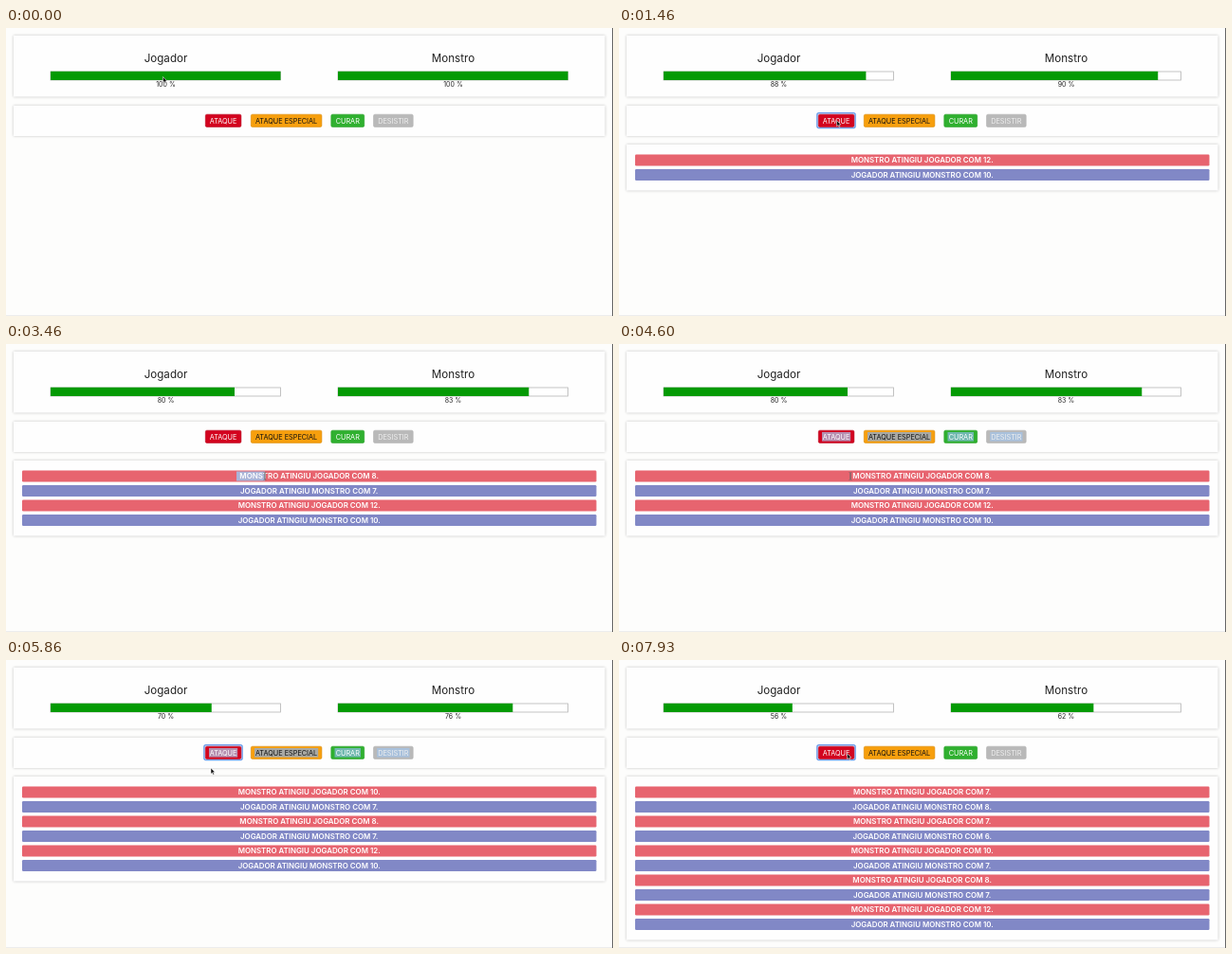
These frames come from a looping animation (640 by 304 pixels, 8 s). An HTML page:

```html
<!DOCTYPE html>
<html lang="pt">
<head>
<meta charset="utf-8">
<style>
html, body { margin: 0; width: 100%; height: 100%; overflow: hidden; background: #fdfdfc; }
svg { display: block; width: 640px; height: 304px; font-family: Inter, Roboto, sans-serif; text-anchor: middle; }
.panel { fill: #fefefe; filter: drop-shadow(0 .6px 1.6px rgba(0, 0, 0, .24)); }
.title { font-size: 11.6px; fill: #222; }
.value { font-size: 7px; fill: #222; }
.button { font-size: 7.3px; }
.log { font-size: 7.9px; font-weight: 600; fill: #fff; }
</style>
</head>
<body>
<svg id="stage" viewBox="0 0 640 304"></svg>
<script>
const LOOP = 8000;
const stage = document.getElementById('stage');

function add(parent, tag, attrs, text) {
  const node = document.createElementNS('http://www.w3.org/2000/svg', tag);
  set(node, attrs);
  if (text) node.textContent = text;
  parent.appendChild(node);
  return node;
}
function set(node, attrs) {
  for (const key in attrs) node.setAttribute(key, attrs[key]);
}
function show(node, on) {
  node.setAttribute('visibility', on ? 'visible' : 'hidden');
}
const rect = (parent, x, y, width, height, attrs) =>
  add(parent, 'rect', { x, y, width, height, ...attrs });
const label = (parent, x, y, cls, text, fill) =>
  add(parent, 'text', { x, y, class: cls, ...(fill && { style: 'fill:' + fill }) }, text);

// Each round: time, damage to player, damage to monster
const rounds = [[530, 12, 10], [1730, 8, 7], [5130, 10, 7], [7260, 7, 6], [7800, 7, 8]];

// Pointer stops: time, x, y
const path = [
  [0, 165.5, 51.5], [60, 165.5, 51.5], [460, 229.5, 97.5], [2800, 229.5, 97.5],
  [3060, 243.5, 139.5], [3460, 273, 139.5], [3600, 281, 139.5], [3660, 281, 139.5],
  [4060, 250, 139.5], [4330, 250, 139.5], [4530, 244, 139.5], [4860, 244, 139.5],
  [5060, 229, 98], [5600, 229, 98], [5860, 216, 114], [6330, 216, 114],
  [6600, 236, 103], [7000, 236, 103], [7130, 240.5, 98.5], [LOOP, 240.5, 98.5]
];

function pointerAt(t) {
  let i = 1;
  while (i < path.length - 1 && t >= path[i][0]) i++;
  const [t0, x0, y0] = path[i - 1], [t1, x1, y1] = path[i];
  const p = Math.min(1, (t - t0) / (t1 - t0));
  const e = p * p * (3 - 2 * p);
  return [x0 + (x1 - x0) * e, y0 + (y1 - y0) * e];
}

rect(stage, 0, 0, 640, 304, { fill: '#fdfdfc' });
rect(stage, 639, 0, 1, 304, { fill: '#666' });
rect(stage, 0, 303, 639, 1, { fill: '#ececec' });
rect(stage, 8, 8, 623.5, 64.5, { class: 'panel' });
rect(stage, 8, 82, 623.5, 32, { class: 'panel' });

function makeBar(x, name) {
  label(stage, x + 121.5, 35.6, 'title', name);
  rect(stage, x, 46, 242.5, 9, { fill: '#fff', stroke: '#b4b4b4', 'stroke-width': .8 });
  const fill = rect(stage, x, 45.8, 242.5, 9.2, { fill: '#049a04' });
  const value = label(stage, x + 121.5, 62.1, 'value', '100 %');
  return life => {
    set(fill, { width: 242.5 * life / 100 });
    value.textContent = life + ' %';
  };
}
const setPlayer = makeBar(47, 'Jogador');
const setMonster = makeBar(350, 'Monstro');

const focusRing = rect(stage, 208.9, 89.8, 40.2, 15.8,
  { rx: 2, fill: '#fff', stroke: '#6d9eeb', 'stroke-width': 1.5 });

// x, width, caption, fill, border, text, selection
const marks = [
  [210, 38.2, 'ATAQUE', '#d3041f', '#b8041c', '#fff', '#b58fb0'],
  [258, 75.2, 'ATAQUE ESPECIAL', '#f79f0d', '#d98a08', '#111', '#a9a9a4'],
  [342.5, 35.5, 'CURAR', '#2fb02f', '#26a026', '#fff', '#6fb8ae'],
  [387.2, 42.3, 'DESISTIR', '#b9b9b9', '#b3b3b3', '#efefef', '#a9c1dc']
].map(([x, w, text, fill, stroke, color, tint]) => {
  rect(stage, x + .3, 91.2, w - .6, 13.2, { rx: 1.5, fill, stroke, 'stroke-width': .6 });
  const mark = rect(stage, x + 4, 93, w - 8, 9.6, { fill: tint });
  label(stage, x + w / 2, 100.5, 'button', text, color);
  return mark;
});

const logPanel = rect(stage, 8, 123, 623.5, 48.5, { class: 'panel' });
const rows = rounds.flatMap(() => ['#e7646f', '#8188c6']).map((fill, i) => {
  const y = 133.5 + 15.5 * i;
  const group = add(stage, 'g', {});
  rect(group, 17, y, 605.5, 12, { rx: 1.2, fill });
  const mark = i ? null : rect(group, 243, y + 1, 0, 10, { fill: '#a9b4d8' });
  const text = label(group, 319.7, y + 8.9, 'log', ' ');
  return { group, mark, text };
});

const arrow = add(stage, 'path', {
  d: 'M0 0V6.2L1.5 4.9L2.5 7.2L3.5 6.8L2.5 4.5H4.4Z',
  fill: '#111', stroke: '#fff', 'stroke-width': .5
});
const beam = add(stage, 'path', {
  d: 'M-1.5 -4Q0 -4 0 -3V3Q0 4 -1.5 4M1.5 -4Q0 -4 0 -3V3Q0 4 1.5 4',
  fill: 'none', stroke: '#666', 'stroke-width': .7
});

const within = (t, from, to) => t >= from && t < to;

function draw(t) {
  const done = rounds.filter(r => t >= r[0]);
  setPlayer(done.reduce((life, r) => life - r[1], 100));
  setMonster(done.reduce((life, r) => life - r[2], 100));

  const lines = [...done].reverse().flatMap(r => [
    `MONSTRO ATINGIU JOGADOR COM ${r[1]}.`,
    `JOGADOR ATINGIU MONSTRO COM ${r[2]}.`
  ]);
  show(logPanel, lines.length);
  set(logPanel, { height: 17.5 + 15.5 * lines.length });
  rows.forEach((row, i) => {
    show(row.group, i < lines.length);
    row.text.textContent = lines[i] || '';
  });

  const [x, y] = pointerAt(t);
  const selecting = within(t, 3060, 4400);
  set(rows[0].mark, { width: selecting ? Math.max(0, x - 243) : 0 });
  marks.forEach(mark => show(mark, within(t, 4400, 6400)));
  show(focusRing, within(t, 460, 3060) || within(t, 5000, 6400) || t >= 7060);

  const overText = within(t, 2990, 4900);
  show(arrow, !overText);
  show(beam, overText);
  set(overText ? beam : arrow, { transform: `translate(${x} ${y})` });
}

const start = performance.now();
function tick() {
  draw((performance.now() - start) % LOOP);
  requestAnimationFrame(tick);
}
tick();
</script>
</body>
</html>
```
